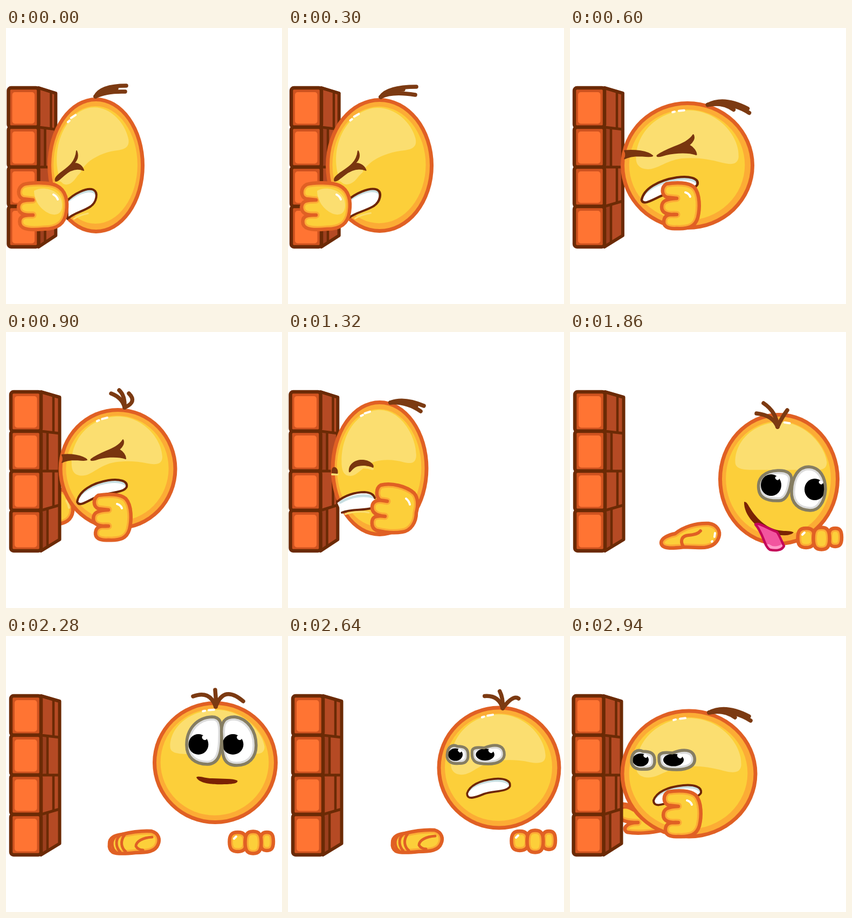
An HTML page with a canvas for the animation above (3000 ms loop, 512 by 512 pixels).

```html
<!DOCTYPE html>
<html lang="en">
<head>
<meta charset="utf-8">
<title>Head against the wall</title>
<style>
html, body { margin: 0; width: 100%; height: 100%; overflow: hidden; background: #fff; }
canvas { display: block; width: 512px; height: 512px; }
</style>
</head>
<body>
<canvas id="stage" width="512" height="512"></canvas>
<script>
const ctx = document.getElementById('stage').getContext('2d');
const LOOP = 3000, STEP = 60, RAD = Math.PI / 180;
const RIM = '#e06024', ORANGE = '#fcac35', YELLOW = '#fccf3a', PALE = '#fbde70';
const HAIR = '#7c3a12', LID = '#79350f', WALL = '#6b2a05';

// Head: cx, cy, rx, ry. Hair: root, then control point and tip of three strands.
const poses = {
  press: { head: [167, 255, 90, 126], tilt: -16, glint: -36,
    hair: [166, 127, 176, 107, 223, 107, 186, 117, 221, 118, 176, 112, 205, 112] },
  lean: { head: [170, 255, 100, 125], tilt: -16, glint: -33,
    hair: [172, 128, 184, 109, 238, 109, 192, 117, 236, 124, 184, 114, 214, 114] },
  back: { head: [207.5, 254, 110, 113], tilt: 0, glint: -18,
    hair: [220, 140, 216, 122, 195, 114, 221, 118, 210, 108, 244, 130, 228, 114] },
  crash: { head: [170, 253, 90.5, 126], tilt: 0, glint: -20,
    hair: [190, 131, 215, 121, 252, 137, 220, 129, 246, 147, 210, 124, 238, 137] },
  dizzy: { head: [387.5, 273, 112.5, 123], tilt: 0, glint: 6,
    hair: [385, 176, 376, 154, 346, 151, 383, 148, 359, 132, 392, 160, 403, 145] },
  calm: { head: [388, 235, 116, 114], tilt: 0, glint: -7,
    hair: [389, 131, 378, 100, 347, 112, 390, 115, 388, 100, 404, 90, 440, 121] },
  dash: { head: [220.5, 255.5, 127, 120], tilt: 5, glint: -9,
    hair: [258, 142, 288, 126, 332, 149, 300, 135, 335, 157, 285, 136, 306, 151] }
};

// time, face, pose, head ellipse (null: that of the pose), wall shift
const moves = [
  [0, 'push', 'press', null, -4.5],
  [300, 'push', 'lean', null, -3],
  [360, 'push', 'lean', [186, 254, 108, 119], -1],
  [420, 'strain', 'back', [210, 252, 111, 114], 0],
  [540, 'strain', 'back', [238, 248, 114, 116], 0],
  [600, 'strain', 'dash', [218, 255, 124, 119], -1],
  [660, 'push', 'press', null, -4.5],
  [780, 'push', 'lean', null, -3],
  [840, 'strain', 'back', [186, 254, 106, 117], -1],
  [900, 'strain', 'back', null, 0],
  [1080, 'strain', 'back', [272, 249, 116, 116], 0],
  [1200, 'strain', 'dash', [250, 254, 122, 118], 0],
  [1260, 'strain', 'dash', null, -2],
  [1320, 'wince', 'crash', null, -4.5],
  [1380, 'wince', 'crash', [184, 252, 100, 121], -3],
  [1440, 'wince', 'back', [250, 242, 118, 114], 0],
  [1500, 'daze', 'back', [335, 235, 120, 112], 0],
  [1560, 'daze', 'dizzy', [390, 248, 118, 116], 0],
  [1620, 'daze', 'dizzy', [396, 268, 113, 120], 0],
  [1740, 'daze', 'dizzy', [389, 277, 115, 119], 0],
  [1860, 'daze', 'dizzy', null, 0],
  [2100, 'daze', 'dizzy', [388, 264, 113, 121], 0],
  [2160, 'plain', 'dizzy', [388, 255, 114, 119], 0],
  [2280, 'plain', 'calm', null, 0],
  [2400, 'plain', 'calm', [388, 215, 114, 120], 0],
  [2580, 'glare', 'calm', [390, 238, 116, 114], 0],
  [2700, 'glare', 'back', [393, 251, 114, 116], 0],
  [2760, 'glare', 'back', [382, 252, 118, 118], 0],
  [2880, 'glare', 'dash', [280, 254, 128, 118], 0],
  [2940, 'glare', 'dash', null, -2.5],
  [3000, 'push', 'press', null, -4.5]
].map(([t, face, name, head, wall]) => {
  const p = poses[name], c = p.head;
  const hair = p.hair.map((v, i) => v - (i % 2 ? c[1] - c[3] : c[0]));
  return { t, face, v: [...(head || c), wall, p.tilt, p.glint, ...hair] };
});

// time, shape, offset
const near = [
  [0, 'grip', 0, 0], [300, 'grip', 2, 0], [360, 'fist', -30, -4], [540, 'fist', 32, -8],
  [600, 'fist', 8, -14], [660, 'grip', 0, 0], [780, 'grip', 2, 0], [840, 'fist', -25, -2],
  [900, 'fist', 0, 0], [1080, 'fist', 55, -8], [1260, 'fist', 11, -14], [1320, 'big', 0, 0],
  [1380, 'big', 14, 0], [1440, 'fist', 70, -20], [1500, 'knuckles', -45, -45],
  [1620, 'knuckles', 9, -8], [1680, 'knuckles', 8, 0], [2100, 'knuckles', 8, 0],
  [2280, 'knuckles', 0, 0], [2640, 'knuckles', 0, -2], [2700, 'fist', 190, -10],
  [2760, 'fist', 172, -14], [2940, 'fist', 11, -14], [3000, 'grip', 0, 0]
];
const far = [
  [0, 'none', 0, 0], [420, 'side', 0, 0], [540, 'side', 8, -4], [600, 'none', 0, 0],
  [900, 'side', 0, 0], [1080, 'side', 12, -6], [1200, 'reach', 14, 0], [1260, 'reach', 0, 0],
  [1320, 'none', 0, 0], [1500, 'palm', 20, -45], [1620, 'palm', 0, -4], [1680, 'palm', 0, 0],
  [2160, 'curl', -4, 2], [2280, 'curl', 0, 0], [2640, 'curl', 2, -2], [2760, 'reach', 135, 0],
  [2940, 'reach', 0, 0], [3000, 'none', 0, 0]
];

const path = d => new Path2D(d);
function fill(d, color) { ctx.fillStyle = color; ctx.fill(path(d)); }
function line(d, color, w) { ctx.strokeStyle = color; ctx.lineWidth = w; ctx.stroke(path(d)); }
function oval(x, y, rx, ry, color, turn = 0) {
  ctx.beginPath();
  ctx.ellipse(x, y, Math.max(rx, 1), Math.max(ry, 1), turn * RAD, 0, 7);
  ctx.fillStyle = color;
  ctx.fill();
}
function box(x, y, w, h, r, color) {
  ctx.beginPath();
  ctx.roundRect(x, y, w, h, r);
  ctx.fillStyle = color;
  ctx.fill();
}
function inside(d, draw) {
  ctx.save();
  ctx.clip(path(d));
  draw();
  ctx.restore();
}
function skin(d) {
  fill(d, YELLOW);
  inside(d, () => line(d, ORANGE, 13));
  line(d, RIM, 6.5);
}
function lid(d) {
  fill(d, LID);
  line(d, LID, 2);
}
function teeth(d) {
  fill(d, '#c8dfe2');
  inside(d, () => { ctx.translate(-1, 6); fill(d, '#fff'); });
  line(d, '#6e2606', 4);
}
function eye(d, x, y, rx, ry, r = 5) {
  fill(d, '#fff');
  inside(d, () => {
    line(d, '#dcdcdc', 13);
    oval(x, y, rx, ry, '#000');
    oval(x + rx * .6, y - ry * .65, r, r * .8, '#fff', 40);
  });
  line(d, '#857d62', 5.5);
}

const hands = {
  none() {},
  grip() {
    skin('M50 319 L32 317 C20 313 21 296 33 290 C46 286 80 286 93 292 C112 301 115 322 112 341 C109 363 96 373 70 373 C48 375 30 375 26 364 C23 351 30 346 50 347 C31 348 23 343 23 332 C24 321 32 319 50 319Z');
    fill('M52 302 C68 292 98 300 103 320 C108 344 94 350 80 344 C64 337 52 320 52 302Z', PALE);
    line('M88 309 Q94 312 96 318', '#fff', 4);
  },
  fist() {
    skin('M190 330 L172 328 C161 324 161 309 171 303 C189 300 212 300 222 309 C234 322 233 350 229 366 C224 383 212 387 190 386 C173 387 165 382 166 372 C167 362 173 359 190 360 C172 361 162 357 162 346 C162 335 170 331 190 330Z');
    line('M206 319 Q213 321 215 327', '#fff', 4);
  },
  big() {
    skin('M184 314 L171 312 C162 306 163 289 172 284 C192 279 220 286 234 299 C243 310 241 324 238 335 C238 353 228 369 212 371 C195 374 176 371 164 368 C153 363 154 347 161 343 Q168 340 180 342 C163 341 155 334 156 324 C157 313 166 310 184 314Z');
    line('M219 309 Q225 314 226 320', '#fff', 4);
  },
  knuckles() {
    for (const [x, y, rx, ry] of [[430, 382, 15.5, 18], [484, 381, 12, 17], [458.5, 383, 15, 20.5]]) {
      const l = x - rx, r = x + rx, t = y - ry, b = y + ry, k = rx * .75, m = ry * .7;
      skin(`M${l} ${y} C${l} ${y - m} ${x - k} ${t} ${x} ${t} S${r} ${y - m} ${r} ${y} S${x + k} ${b} ${x} ${b} S${l} ${y + m} ${l} ${y}Z`);
    }
    line('M423 376 L427 372', '#fff', 4);
  },
  side() {
    skin('M90 292 C113 288 125 310 124 332 C122 349 110 356 90 357Z');
    line('M112 313 Q116 320 117 326', PALE, 4);
  },
  reach() {
    skin('M90 312 C112 308 135 324 172 360 C150 366 122 367 106 364 C97 359 102 346 126 346 C104 346 96 342 90 336Z');
    line('M96 319 C103 316 111 319 117 323', RIM, 5);
  },
  palm() {
    skin('M169 391 C169 382 184 376 195 374 C211 361 234 354 257 355 C273 357 280 369 276 381 C271 396 258 401 239 400 L212 399 C193 401 170 404 169 391Z');
    line('M210 398 C203 385 209 378 220 377 C232 376 238 374 242 369', RIM, 6);
    line('M269 373 L268 380 M264 388 L263 389', '#fff', 4);
  },
  curl() {
    skin('M192 385 C192 374 201 370 215 368 C235 363 255 361 270 362 C284 366 286 378 282 387 C277 400 262 402 240 402 C222 404 206 405 198 401 C192 397 191 392 192 385Z');
    line('M203 372 C194 380 196 394 204 401 M211 370 C201 380 205 393 212 401 M220 369 C211 381 214 393 222 400 M271 373 C254 374 241 381 241 390 Q245 397 254 397', RIM, 5);
  }
};

const faces = {
  push: { ref: 'press', draw() {
    fill('M98 284 C112 270 130 262 140 266 C134 274 122 284 108 287Z', PALE);
    lid('M92 284 C90 279 94 275 101 269 C113 260 129 251 131 228 C135 238 131 246 126 251 C135 250 142 257 144 264 C132 259 120 262 108 273 C101 279 95 285 92 284Z');
    teeth('M113 321 C125 308 150 295 162 300 C172 305 168 323 157 331 C142 341 128 342 114 354Z');
    line('M126 354 Q136 347 152 344', PALE, 3);
  } },
  strain: { ref: 'back', draw() {
    lid('M104 242 C107 237 106 232 104 228 C120 226 142 229 150 237 C147 239 140 238 130 237 C118 237 109 239 104 242Z');
    lid('M158 236 C180 220 206 218 217 200 C220 206 216 213 210 218 C217 222 222 229 222 235 C205 229 180 232 166 237 C159 239 156 238 158 236Z');
    teeth('M132 315 C135 295 160 280 190 275 C210 272 226 276 224 287 C220 298 195 297 175 303 C155 310 136 327 132 315Z');
  } },
  wince: { ref: 'crash', draw() {
    line('M116 261 C126 250 142 249 157 254 M82 264 L92 264', PALE, 4);
    fill('M81 262 C80 252 84 249 88 251 C93 254 93 260 92 263Z', LID);
    fill('M113 260 C111 244 126 236 139 237 C153 238 162 247 158 252 C150 248 135 246 125 251 C118 255 116 262 113 260Z', LID);
    fill('M91 316 C105 303 125 297 142 297 C155 298 162 303 161 312 L158 326 C140 332 118 327 100 336Z', '#fff');
    line('M97 316 C118 304 140 301 158 306', '#c8dfe2', 5);
    line('M91 315 C105 303 125 297 142 297 Q158 298 161 308 M100 335 C118 327 140 332 158 326', '#6e2606', 4);
    line('M106 338 Q128 331 150 335', PALE, 3);
  } },
  daze: { ref: 'dizzy', draw(t) {
    const a = (t - 1860) / 600 * 2 * Math.PI;
    const x = 5 * (Math.cos(a) - 1), y = 5 * Math.sin(a);
    eye('M350 292 C347 270 362 258 385 257 C402 256 412 262 411 275 C408 295 402 313 388 313 C366 314 352 308 350 292Z', 373 + x, 284 + y, 19, 20, 4);
    eye('M411 295 C412 268 424 250 443 250 C464 251 474 270 474 292 C472 318 460 332 445 331 C424 330 410 318 411 295Z', 454 + x, 292 - y, 19, 20, 4);
    fill('M323 315 C328 315 330 320 333 325 C348 350 368 365 388 368 C400 370 410 368 415 372 C408 379 390 378 375 375 C347 366 322 340 323 315Z', '#7a2204');
    const tongue = 'M344 357 C352 353 362 363 384 371 C389 378 392 387 397 397 C393 406 380 406 371 404 C360 398 360 376 344 357Z';
    fill(tongue, '#f2559f');
    inside(tongue, () => line('M368 398 Q380 407 398 396', '#ff9ac8', 9));
    line(tongue, '#c4065a', 4.5);
  } },
  plain: { ref: 'calm', draw() {
    eye('M335 202 C335 172 355 151 382 150 C397 150 401 160 400 185 C400 215 396 237 374 238 C350 238 335 225 335 202Z', 357, 201, 18.5, 19);
    eye('M400 185 C398 160 405 150 424 150 C448 153 464 175 464 203 C464 226 450 240 428 240 C404 240 400 225 400 185Z', 421, 201, 19.5, 19);
    fill('M353 262 C358 258 368 264 382 264 C402 265 420 264 429 268 C432 273 420 275 405 275 C385 276 358 274 353 262Z', '#7a2204');
  } },
  glare: { ref: 'dash', draw() {
    eye('M114 230 C115 215 125 209 135 214 C150 214 157 218 157 230 C158 243 150 248 138 247 C122 249 113 242 114 230Z', 131, 230, 15, 12, 4);
    eye('M165 226 C164 216 175 215 190 217 C210 209 228 210 231 225 C234 240 220 248 198 248 C175 248 164 245 165 226Z', 192, 230, 19, 11.5, 5);
    teeth('M155 305 C160 290 180 280 210 277 C230 275 245 280 243 291 C238 302 210 300 190 306 C170 314 155 318 155 305Z');
  } }
};

// Shine on the unit head, for a turned and for a frontal face
const SIDE_SHINE = 'M-.78 -.1 C-.78 -.55 -.4 -.86 0 -.86 C.42 -.86 .74 -.5 .75 -.2 C.75 -.06 .62 -.07 .5 -.09 C.3 -.13 .1 -.14 -.1 -.1 C-.35 -.04 -.45 .12 -.62 .11 C-.76 .1 -.78 0 -.78 -.1Z';
const FRONT_SHINE = 'M-.72 -.26 C-.72 -.6 -.38 -.86 .02 -.86 C.44 -.86 .76 -.5 .79 -.26 C.79 -.13 .68 -.14 .55 -.14 L-.45 -.14 C-.63 -.14 -.72 -.17 -.72 -.26Z';

function drawWall(shift) {
  ctx.save();
  ctx.translate(shift, 0);
  const right = 99.5 + shift * .6;
  const rows = [111, 184, 258, 331, 406], edge = [121, 188, 258, 321, 385];
  fill(`M65 111 L${right} 121 V385 L65 406Z`, '#b54a24');
  for (let i = 0; i < 4; i++) {
    const top = rows[i], h = rows[i + 1] - top;
    const x = i % 2 ? 77 : 88, k = (x - 65) / (right - 65);
    const y = j => rows[j] + (edge[j] - rows[j]) * k;
    fill(`M65 ${top} L${x} ${y(i)} V${y(i + 1)} L65 ${top + h}Z`, i % 2 ? '#9c3f1e' : '#b54a24');
    line(`M${x} ${y(i)} V${y(i + 1)}`, WALL, 4.5);
    line(`M65 ${top} L${right} ${edge[i]}`, WALL, 5);
    box(9, top, 56, h, 5, '#cf5320');
    ctx.strokeStyle = WALL;
    ctx.lineWidth = 6.5;
    ctx.stroke();
    box(16, top + 8, 41.5, h - 14.5, 5, '#ff7433');
  }
  line(`M65 111 L${right} 121 V385 L65 406`, WALL, 6);
  ctx.restore();
}

function drawHead(face, v, t) {
  const [cx, cy, rx, ry, , tilt, glint, ...hair] = v;
  const inset = 15.5 / 115;
  oval(cx, cy, rx, ry, RIM);
  oval(cx, cy, rx - 7, ry - 7, ORANGE);
  oval(cx - 1, cy - 1, rx * (1 - inset), ry * (1 - inset), YELLOW);

  ctx.save();
  ctx.translate(cx, cy);
  ctx.scale(rx, ry);
  ctx.rotate(tilt * RAD);
  fill(face === 'daze' || face === 'plain' ? FRONT_SHINE : SIDE_SHINE, PALE);
  ctx.restore();

  for (const [turn, half] of [[glint - 5, 2], [glint + 3, 5]]) {
    const a = turn * RAD;
    ctx.save();
    ctx.translate(cx + Math.sin(a) * rx * .86, cy - Math.cos(a) * ry * .86);
    ctx.rotate(a);
    line(`M${-half} 0 H${half}`, '#fff', 4);
    ctx.restore();
  }

  const { ref, draw } = faces[face], r = poses[ref].head;
  ctx.save();
  ctx.translate(cx, cy);
  ctx.scale(rx / r[2], ry / r[3]);
  ctx.translate(-r[0], -r[1]);
  draw(t);
  ctx.restore();

  ctx.save();
  ctx.translate(cx, cy - ry);
  const [x, y, ...s] = hair;
  for (let i = 0; i < s.length; i += 4) line(`M${x} ${y} Q${s.slice(i, i + 4).join(' ')}`, HAIR, 7.5);
  ctx.restore();
}

function drawHand(track, t) {
  const i = track.findLastIndex(k => k[0] <= t);
  const [t0, shape, x, y] = track[i], next = track[i + 1];
  const k = next[1] === shape ? (t - t0) / (next[0] - t0) : 0;
  ctx.save();
  ctx.translate(x + (next[2] - x) * k, y + (next[3] - y) * k);
  hands[shape]();
  ctx.restore();
}

function render(t) {
  const i = moves.findLastIndex(m => m.t <= t);
  const a = moves[i], b = moves[i + 1], k = (t - a.t) / (b.t - a.t);
  const v = a.v.map((n, j) => n + (b.v[j] - n) * k);
  ctx.fillStyle = '#fff';
  ctx.fillRect(0, 0, 512, 512);
  ctx.lineCap = ctx.lineJoin = 'round';
  drawHand(far, t);
  drawWall(v[4]);
  drawHead(a.face, v, t);
  drawHand(near, t);
}

const start = performance.now();
function tick() {
  const t = (performance.now() - start) % LOOP;
  render(Math.floor(t / STEP) * STEP);
  requestAnimationFrame(tick);
}
tick();
</script>
</body>
</html>
```
